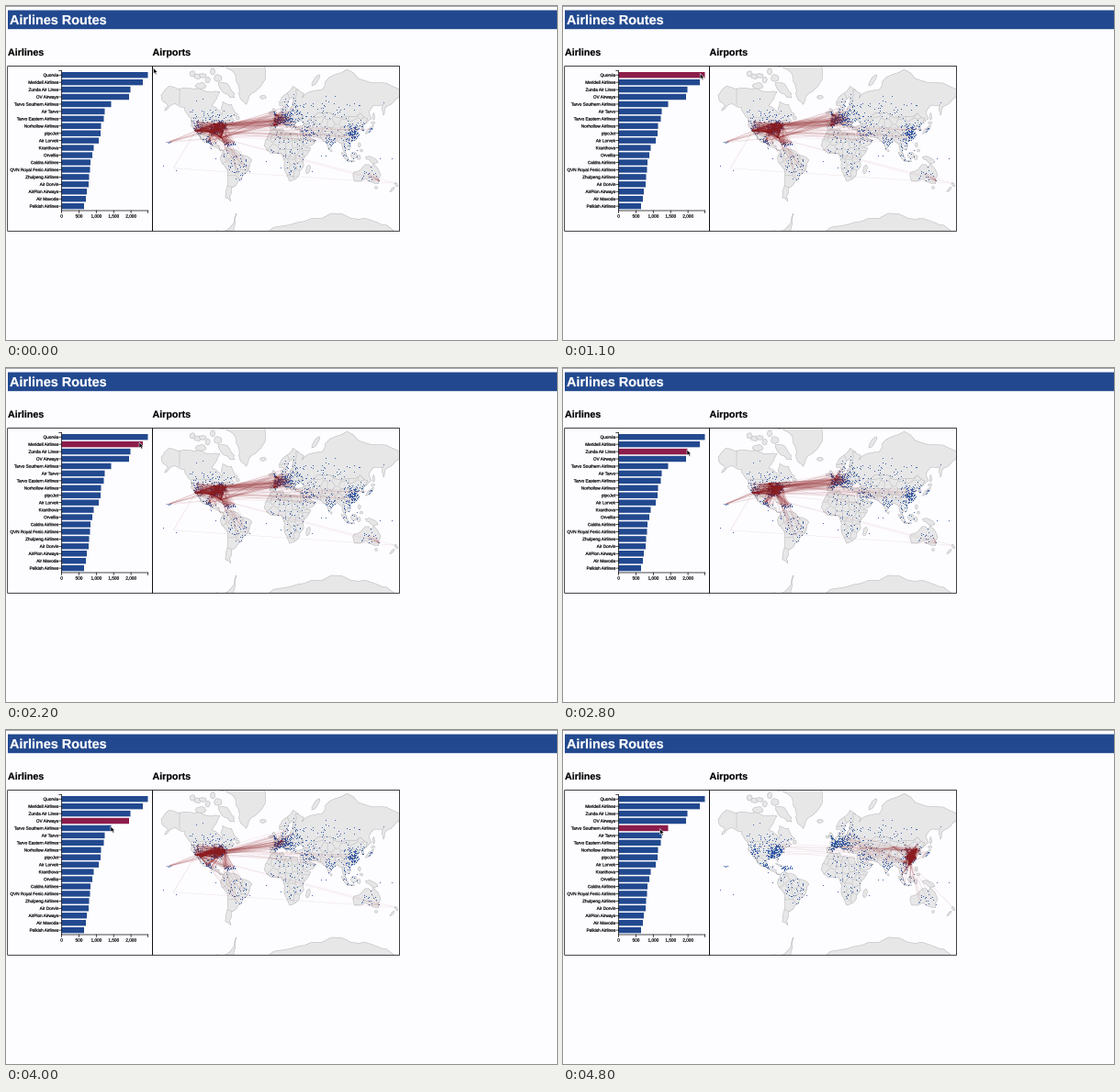
A matplotlib script that plays this animation: 600x364 px, repeating every 5000 ms.

```python
from itertools import combinations

import numpy as np
import matplotlib.pyplot as plt
from matplotlib.animation import FuncAnimation
from matplotlib.collections import LineCollection
from matplotlib.colors import to_rgb
from matplotlib.patches import PathPatch, Polygon, Rectangle
from matplotlib.path import Path
from matplotlib.textpath import TextPath
from matplotlib.transforms import Affine2D

W, H, DPI = 600, 364, 100
PX = 72 / DPI
PAPER, BLUE, RED = "#fdfcff", "#22498f", "#8c1d4b"
LAND, COAST, DOT, ROUTE = "#e7e7e8", "#b4b4b6", "#2753a2", "#8f1c20"

plt.rcParams["font.family"] = "Liberation Sans"
plt.rcParams["path.snap"] = False
fig = plt.figure(figsize=(W / DPI, H / DPI), dpi=DPI, facecolor=PAPER)
ax = fig.add_axes([0, 0, 1, 1])
ax.set_xlim(0, W)
ax.set_ylim(H, 0)
ax.axis("off")
rng = np.random.default_rng(12)


def rect(x, y, w, h, **kw):
    return ax.add_patch(Rectangle((x, y), w, h, **kw))


def line(x0, y0, x1, y1):
    ax.plot([x0, x1], [y0, y1], color="black", lw=0.7 * PX, zorder=3)


def text(x, y, s, size, color="black", weight="normal", shift=0):
    """Text as outlines; shift is the part of its width left of x."""
    glyphs = TextPath((0, 0), s, size=size, prop={"weight": weight})
    x -= shift * glyphs.get_extents().x1
    place = Affine2D().scale(1, -1).translate(x, y)
    ax.add_patch(PathPatch(glyphs.transformed(place), fc=color, ec=color,
                           lw=0.2 * PX, zorder=4))


# Header and headings
rect(0, 0, W, 1, fc="#a5a5aa", lw=0)
rect(2, 4.6, W - 2, 20.6, fc=BLUE, lw=0)
text(4, 20, "Airlines Routes", 14.4, "white", "bold")
text(2, 54, "Airlines", 10.7, weight="bold")
text(159.5, 54, "Airports", 10.7, weight="bold")

# Bar chart
names = ["Quorvia", "Meridell Airlines", "Zunda Air Lines", "OV Airways",
         "Tarvo Southern Airlines", "Air Tarvo", "Tarvo Eastern Airlines",
         "Norhollow Airlines", "pipoJet", "Air Lorvek", "Kranthova",
         "Orvellia", "Caldra Airlines", "QVN Royal Fenic Airlines",
         "Zhulpeng Airlines", "Air Dorvin", "AirPlon Airways", "Air Mavoda",
         "Pelkish Airlines"]
widths = [94, 88.5, 75, 73.5, 54, 47, 46, 43, 42.5, 40.5, 35, 33.5, 31.5, 31,
          30, 29.5, 27.5, 26.5, 24.5]
X0, X1, ROW0, STEP, BASE = 60.5, 154.5, 75.2, 7.94, 223
bars = []
for i, (name, width) in enumerate(zip(names, widths)):
    y = ROW0 + i * STEP
    bars.append(rect(X0, y - 3.2, width, 6.4, fc=BLUE, lw=0, zorder=2))
    line(57.7, y, X0, y)
    text(57, y + 1.7, name, 4.7, shift=1)
line(X0, 70.5, X0, BASE)
line(57.7, 70.5, X0, 70.5)
line(X0, BASE, X1, BASE)
line(X1, BASE, X1, BASE + 2.5)
for k in range(5):
    x = X0 + 18.9 * k
    line(x, BASE, x, BASE + 2.5)
    text(x, 230.6, f"{500 * k:,}", 4.7, shift=0.5)

# Frames of both panels
for x, w in ((1.7, 157.8), (159.5, 269.1)):
    rect(x, 65.6, w, 179.7, fill=False, ec="black", lw=0.75 * PX, zorder=8)
window = Rectangle((160, 66), 268, 179, transform=ax.transData)


def project(points):
    """Mercator lon/lat to stage pixels."""
    lon, lat = np.asarray(points, float).T
    scale = 268 / (2 * np.pi)
    y = 163.5 - scale * np.log(np.tan(np.pi / 4 + np.radians(lat) / 2))
    return np.column_stack([160 + scale * np.radians(lon + 180), y])


def distances(points, sites):
    return np.linalg.norm(points[:, None] - sites[None], axis=2)


def roughen(pts, amount=0.13, rounds=2):
    """Push edge midpoints sideways to break up a coast."""
    for _ in range(rounds):
        after = np.roll(pts, -1, axis=0)
        side = (after - pts)[:, ::-1] * (-1, 1)
        push = rng.uniform(-amount, amount, (len(pts), 1))
        pts = np.stack([pts, (pts + after) / 2 + side * push], 1).reshape(-1, 2)
    return pts


def split(shape, parts):
    """Borders between evenly spread random sites inside a shape."""
    pool = rng.uniform(shape.min(0), shape.max(0), (1200, 2))
    pool = pool[Path(shape).contains_points(pool)]
    sites = pool[:parts]
    for _ in range(2):
        owner = distances(pool, sites).argmin(1)
        sites = np.array([pool[owner == k].mean(0) for k in range(parts)])
    reach = np.linspace(-25, 25, 81)[:, None]
    edges = []
    for a, b in combinations(sites, 2):
        along = (b - a)[::-1] * (-1, 1) / np.linalg.norm(b - a)
        pts = (a + b) / 2 + reach * along
        gap = np.linalg.norm(pts - a, axis=1)
        pts = pts[gap <= distances(pts, sites).min(1) + 1e-6]
        if len(pts) > 1:
            edges.append(pts[[0, -1]])
    return edges


shapes = []


def add_shape(shape, parts=0):
    shapes.append(shape)
    patch = ax.add_patch(Polygon(shape, fc=LAND, ec=COAST, lw=0.5 * PX, zorder=1))
    patch.set_clip_path(window)
    if parts:
        edges = LineCollection(split(shape, parts), colors=COAST, lw=0.45 * PX,
                               zorder=1)
        ax.add_collection(edges, autolim=False)
        edges.set_clip_path(Path(shape), ax.transData)


def land(*pts, parts=0):
    add_shape(roughen(project(pts)), parts)


def island(lon, lat, length, width, tilt=0):
    """Rough ellipse, sized in pixels and tilted in degrees."""
    a = np.linspace(0, 2 * np.pi, 8, endpoint=False)
    oval = np.column_stack([length * np.cos(a), width * np.sin(a)]) / 2
    turn = Affine2D().rotate_deg(-tilt).translate(*project([(lon, lat)])[0])
    add_shape(roughen(turn.transform(oval), 0.2, 1))


# The Americas
land((-168, 66), (-156, 71), (-128, 70), (-95, 68), (-82, 68), (-94, 59),
     (-82, 55), (-79, 51.5), (-78, 62), (-65, 60), (-56, 52), (-66, 50),
     (-61, 46), (-70, 43), (-76, 35), (-81, 31), (-80.5, 25.5), (-84, 30),
     (-97, 28), (-97, 20), (-91, 18.5), (-87, 21), (-88, 16), (-83, 15),
     (-82, 9), (-77, 8), (-81, 7.5), (-94, 16), (-105, 20), (-113, 31),
     (-110, 23.5), (-117, 32.5), (-124, 40), (-124, 48), (-134, 58),
     (-148, 60.5), (-163, 55), (-158, 59), (-165, 62))
land((-77, 8), (-72, 12), (-60, 9), (-50, 1), (-35.2, -6), (-39, -16),
     (-48, -27), (-57, -37), (-65, -42), (-68, -51), (-66, -55), (-74, -52),
     (-71, -20), (-81, -5), (-78, 3), parts=14)
# Africa, Europe, southern Asia, then the north on top of them
land((-6, 35.8), (10, 37), (11, 33.5), (32, 31), (37, 20), (43, 11.8),
     (51, 11.8), (39, -6), (40.5, -15), (35, -21), (32, -29), (20, -34.7),
     (12, -17), (13, -8), (9, 1), (8, 4.3), (-8, 4.4), (-17.3, 14.7),
     (-16, 22), (-9.7, 31), parts=34)
land((-9, 37), (-9, 43), (-2, 43.4), (-4.5, 48.4), (4, 52), (8, 57), (10.5, 57),
     (11, 54), (19, 54.5), (24, 59), (34, 60), (42, 48), (33, 45), (28, 44),
     (28, 41), (23, 36.8), (19.4, 41), (13, 45.5), (18, 40), (16, 38),
     (9, 44), (3, 42.5), (-1, 37), parts=24)
land((5.3, 59), (5, 62), (13, 66.5), (25, 71), (33, 69), (33, 62), (23, 60),
     (24, 65.5), (17, 61), (16.5, 56.5), (13, 55.4), (10.5, 59), parts=3)
land((26, 40), (40, 41), (40, 43.5), (49, 42), (50, 37.5), (54, 38), (51, 45),
     (46, 48), (61, 56), (90, 51), (126, 54), (137, 48), (131, 43), (127, 39.5),
     (129, 35.5), (126, 35), (125, 39.5), (118, 39), (122, 37), (119, 35),
     (122, 30), (117, 23.5), (108, 21.5), (109, 13), (105, 9), (101, 13),
     (103.7, 1.4), (98, 9), (97, 16), (90, 22), (80, 14), (77.5, 8.2),
     (72.7, 20), (66, 25), (56, 27), (49, 30), (51, 25), (59, 22.5),
     (45, 13), (35, 28), (36, 36.5), (27, 37), parts=30)
land((28, 60), (29, 69), (41, 67), (38, 64.5), (54, 68.5), (67, 69), (72, 73),
     (104, 77.5), (140, 72.5), (180, 69.5), (180, 65), (163, 59), (157, 51),
     (157, 60), (142, 59), (136, 54.5), (140, 48), (132, 43), (134, 48),
     (123, 53), (117, 49.5), (87, 49.5), (77, 53.5), (61, 53), (48, 47),
     (48, 42), (37, 45), (40, 50), (31, 54))
# Australia, Greenland, Antarctica
land((114, -23), (131, -12), (136, -12.5), (139, -17.5), (142.5, -11),
     (153, -26), (150, -37.5), (138, -35), (131, -31.6), (115, -34.5))
land((-73, 78), (-60, 82), (-18, 81), (-22, 71), (-40, 65), (-44, 60),
     (-52, 64), (-54, 70), (-60, 76))
land((-180, -78), (-100, -74.5), (-72, -73), (-58, -64), (-62, -74), (-15, -74),
     (10, -71), (52, -67), (110, -67), (150, -69.5), (172, -73), (180, -80))

for place in [(-2, 53.5, 10, 4, 110), (-8, 53.3, 4, 3), (-19, 65, 7, 4),
              (137, 36, 13, 3, 45), (142, 43.5, 4, 3), (101, -0.5, 12, 3, -48),
              (110, -7.5, 8, 1.3), (114, 1, 7, 7), (121, -2, 4, 5),
              (122, 16, 3, 5), (125, 8, 3, 3), (140, -5.5, 15, 5, -25),
              (146.5, -42, 3, 3), (176, -38.5, 5, 2.5, 120),
              (170, -44, 7, 2, 45), (47, -19, 10, 4, 75), (81, 7.5, 1.6, 2.4),
              (-79, 21.5, 8, 1.3, -20), (-70.5, 19, 4, 1.6), (-56, 48.5, 4, 4),
              (143, 50, 8, 1.5, 90), (-72, 69, 24, 9, -45),
              (-110, 71, 12, 7), (-80, 80, 16, 14), (58, 73.5, 15, 4, 55)]:
    island(*place)
for lon in np.linspace(-122, -85, 6):
    island(lon, rng.uniform(73, 77), *rng.uniform(4, 9, 2))
for pts in ([(-123, 49), (-95, 49), (-83, 42.5), (-75, 45), (-67, 46)],
            [(-117, 32.5), (-106, 31.5), (-97, 26)], [(-141, 60), (-141, 70)]):
    ax.plot(*project(pts).T, color=COAST, lw=0.45 * PX, zorder=1)

# Airports: clusters of lon, lat, spreads and count, kept where there is land
clusters = [(-84, 38, 7, 5, 230), (-115, 40, 7, 7, 75), (-90, 52, 25, 5, 55),
            (-100, 21, 5, 4, 50), (-58, -12, 12, 14, 65), (6, 47, 9, 5, 260),
            (24, 50, 12, 9, 110), (45, 32, 9, 6, 60), (15, 0, 20, 18, 80),
            (78, 22, 6, 7, 45), (113, 31, 6, 6, 160), (134, 36, 5, 4, 60),
            (108, 6, 11, 9, 60), (75, 56, 30, 6, 55), (140, -28, 12, 7, 35)]
paths = [Path(s) for s in shapes]
spots = np.vstack([rng.normal((a, b), (c, d), (n, 2))
                   for a, b, c, d, n in clusters])
spots = spots[np.any([p.contains_points(project(spots)) for p in paths], axis=0)]
spots = np.vstack([spots, rng.normal((-68, 17), (5, 2), (28, 2)),
                   rng.normal((-157, 20.8), (1.2, 0.7), (6, 2)),
                   rng.uniform((-175, -25), (175, 15), (16, 2))])
ax.scatter(*project(spots).T, s=0.6, c=DOT, lw=0, zorder=2).set_clip_path(window)


def fan(hubs, box, n):
    """Random links from the hubs to airports inside a lon/lat box."""
    lo, hi = np.array(box[:2]), np.array(box[2:])
    pool = spots[np.all((spots > lo) & (spots < hi), axis=1)]
    goals = pool[rng.integers(len(pool), size=n)]
    starts = np.array(hubs)[rng.integers(len(hubs), size=n)]
    return [project(pair) for pair in zip(starts, goals)]


def network(links):
    """Hidden set of links, fainter the longer they are."""
    length = np.array([np.linalg.norm(b - a) for a, b in links])
    alpha = 0.11 + 0.17 * np.exp(-length / 40)
    colors = [(*to_rgb(ROUTE), a) for a in alpha]
    lines = LineCollection(links, colors=colors, lw=0.5 * PX, zorder=5,
                           visible=False)
    ax.add_collection(lines, autolim=False)
    lines.set_clip_path(window)
    return lines


HOME, TROPICS = (-124, 26, -68, 48), (-105, 8, -60, 25)
SOUTH, EUROPE = (-80, -36, -35, 8), (-10, 36, 28, 60)
GULF, INNER, ISLES = (30, 18, 80, 36), (102, 20, 128, 47), (-160, 18, -154, 23)
SEAS, OUTBACK, FAR_EAST = (95, -8, 125, 18), (115, -38, 154, -12), (112, 22, 142, 40)
WEST, EAST, SYDNEY = (-118, 34), (-74, 41), (151, -34)
AUCKLAND, TAHITI = (175, -37), (-150, -17.5)


def atlantic(hubs, bases, europe, local, far):
    hubs = [WEST, *hubs]
    links = fan(hubs, HOME, 360) + fan(hubs[1:], TROPICS, 75)
    links += fan(hubs, ISLES, 12) + fan(hubs[1:], SOUTH, 16)
    links += fan(hubs, EUROPE, europe) + fan(bases, EUROPE, local)
    links += fan(bases + hubs, GULF, far) + fan(hubs, FAR_EAST, far)
    links += [project((WEST, p)) for p in (SYDNEY, AUCKLAND, TAHITI)]
    links.append(project((TAHITI, AUCKLAND)))
    return links + fan([SYDNEY], OUTBACK, far // 2)


def eastern(hubs, oasis):
    links = fan(hubs, INNER, 440) + fan([oasis], INNER, 14)
    links += fan(hubs[:2], EUROPE, 24) + fan([oasis], GULF, 8)
    links += fan(hubs[:1], SEAS, 22) + fan(hubs[:2], HOME, 8)
    links += fan(hubs, FAR_EAST, 40) + fan(hubs[:1], OUTBACK, 5)
    return links + [project((hubs[0], AUCKLAND))]


one = network(atlantic([(-97, 33), (-88, 42), EAST, (-80, 26)],
                       [(0, 51.5), (-3.6, 40.5)], 100, 65, 14))
two = network(atlantic([(-84, 33.7), EAST, (-83, 42), (-93, 45)],
                       [(2.5, 49), (4.8, 52.3)], 100, 55, 13))
three = network(atlantic([(-112, 33.4), (-81, 35.2), (-75, 40), (-77, 39)],
                         [(8.6, 50)], 60, 22, 6))
four = network(eastern([(113.3, 23.4), (116.5, 40), (121, 31), (114, 30.5),
                        (123, 41.8)], (87.6, 43.8)))
networks = [one, two, three, four]

# Pointer
arrow = np.array([(0, 0), (0, 6.3), (1.5, 5), (2.6, 7.4), (3.7, 6.9),
                  (2.7, 4.6), (4.6, 4.5)])
pointer = ax.add_patch(Polygon(arrow, fc="black", ec="white", lw=0.5 * PX,
                               zorder=10))
# Step, x, y
stops = np.array([(0, 160.5, 67.5), (7, 149.6, 72), (18, 148.5, 76),
                  (22, 145, 81), (31, 130, 93), (38, 128.5, 96.5),
                  (40, 114, 105), (48, 105.5, 107.5)])

# Start step, lit bar, shown network
stages = [(0, None, one), (8, 0, one), (20, 1, one), (26, 2, two),
          (31, None, None), (32, 3, three), (41, 4, four)]


def update(step):
    _, lit, shown = [s for s in stages if s[0] <= step][-1]
    for i, bar in enumerate(bars):
        bar.set_facecolor(RED if i == lit else BLUE)
    for net in networks:
        net.set_visible(net is shown)
    when, x, y = stops.T
    pointer.set_xy(arrow + (np.interp(step, when, x), np.interp(step, when, y)))
    return [pointer, *bars, *networks]


anim = FuncAnimation(fig, update, frames=50, interval=100, repeat=True)
plt.show()
```
